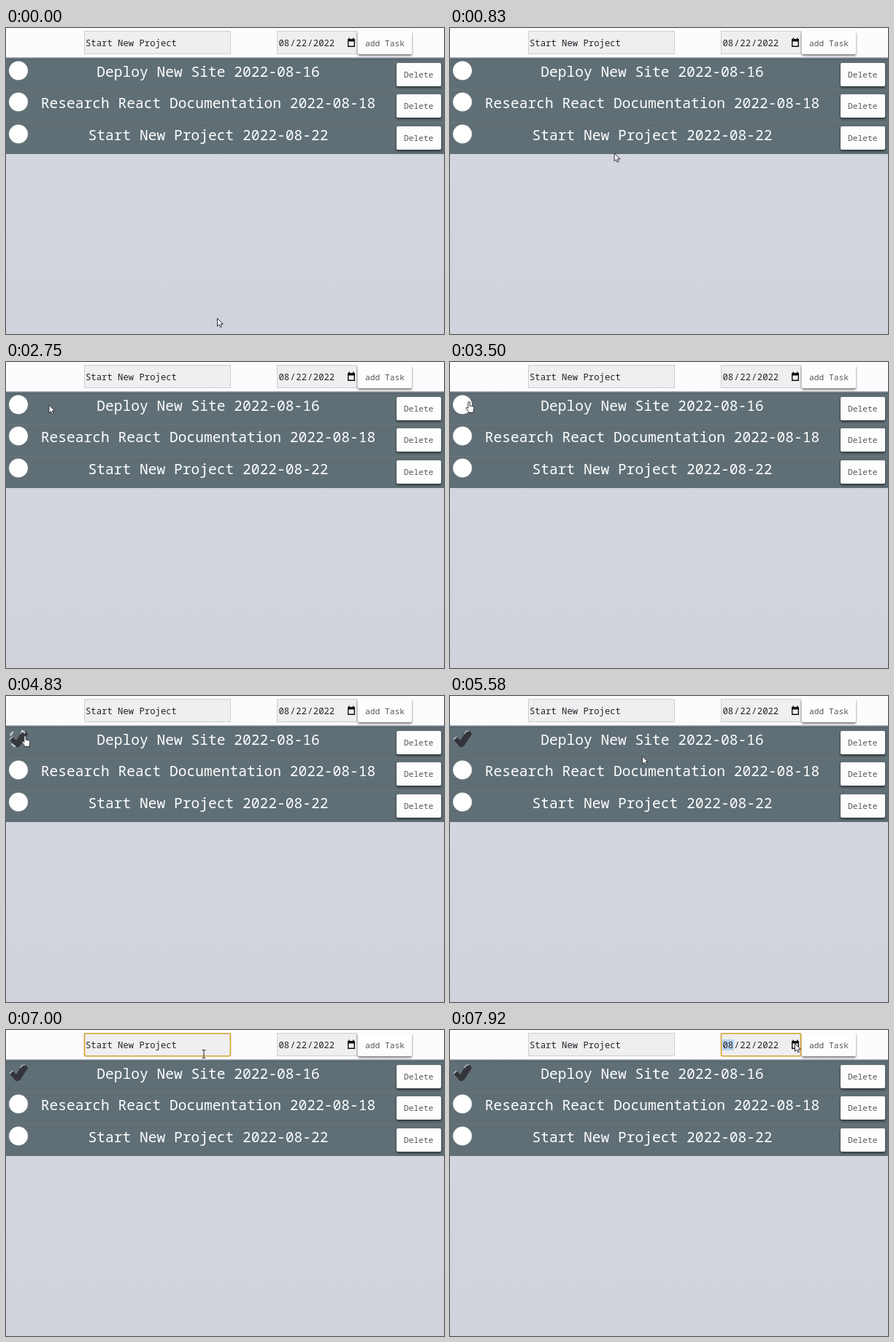
Recreate the animation shown at these times as an HTML page. Size 600 by 420 pixels, loop 8 s.

```html
<!DOCTYPE html>
<html lang="en">
<head>
<meta charset="utf-8">
<title>Task list</title>
<style>
  html, body { margin: 0; width: 100%; height: 100%; overflow: hidden; background: #d1d4de; }
  svg { display: block; }
  text { font-family: "Noto Sans Mono", "DejaVu Sans Mono", monospace; white-space: pre; }
  .task { font-size: 19.6px; fill: #fff; text-anchor: middle; }
  .field { font-size: 12.25px; fill: #26262a; }
  .label { font-size: 11.25px; fill: #56565b; }
  .box { fill: #efeef0; stroke: #cfcfd2; }
  .focus { fill: none; stroke: #d3a22e; stroke-width: 1.6; }
  .button { fill: #fefdfe; filter: drop-shadow(.5px 2px 1.5px #0008); }
  .dot { fill: #fff; stroke: #fff6; }
  .pointer { fill: #fff; stroke: #2a2d33; stroke-linejoin: round; }
</style>
</head>
<body>
<svg width="600" height="420" viewBox="0 0 600 420">
  <defs>
    <linearGradient id="page" x2="0" y2="1">
      <stop stop-color="#d3d5df"/><stop offset="1" stop-color="#d0d3dc"/>
    </linearGradient>
    <linearGradient id="shade" x2="0" y2="1">
      <stop stop-color="#c9ccd5"/><stop offset=".45" stop-color="#57636f"/><stop offset="1" stop-color="#5f6f75"/>
    </linearGradient>
  </defs>
  <rect y="172" width="600" height="248" fill="url(#page)"/>
  <rect width="600" height="41" fill="#fdfbfd"/>
  <g id="rows"></g>
  <rect y="40" width="600" height="5" fill="url(#shade)"/>

  <rect class="box" x="107.5" y="4.5" width="200" height="31"/>
  <text class="field" x="109" y="25">Start New Project</text>
  <rect class="box" x="371.5" y="4.5" width="109" height="31"/>
  <rect id="select" x="373" y="13" width="16" height="15" fill="#b5d2ec"/>
  <g class="field">
    <text x="373.5" y="25">08</text><text x="389.3" y="25">/</text>
    <text x="397.3" y="25">22</text><text x="413" y="25">/</text>
    <text x="420.8" y="25">2022</text>
  </g>
  <path d="M468.7 16.5h8.6v8.8h-8.6z" fill="none" stroke="#111" stroke-width="1.4"/>
  <path d="M468 15h10v3.4h-10zM469.5 13.5h1.5v2h-1.5zM475 13.5h1.5v2h-1.5z" fill="#111"/>
  <rect class="button" x="482" y="4" width="74" height="32" rx="2"/>
  <text class="label" x="492" y="24.5">add Task</text>
  <rect id="nameFocus" class="focus" x="107.5" y="4.7" width="200" height="31" rx="2"/>
  <rect id="dateFocus" class="focus" x="371.5" y="4.7" width="109" height="31" rx="2"/>

  <g id="tick">
    <path d="M5 60L9 56L14 61L22 48.5L27 48L30 52L19 69L14 70.5Z" fill="#34353a"/>
    <path d="M5 60L9 56M20 52L22 48.5L26 48" fill="none" stroke="#cfd3d6" stroke-width="1.2"/>
  </g>
  <circle id="ring" cx="17" cy="58.5" fill="none" stroke="#fff" pathLength="100" stroke-dashoffset="-5.5"/>

  <g id="cursor">
    <path id="arrow" class="pointer" d="M.5 .5V11.3L3 9L4.7 12.7L6.5 11.9L4.9 8.3H8.3Z"/>
    <path id="hand" class="pointer" d="M-1.2 1.2Q0 -.4 1.2 1.2V6L5.5 7Q7.2 7.4 7 9.2L6 13.2V15.5H-.8V13.8L-4 9.6Q-4 7.8 -2.4 8.4L-1.2 9.6Z"/>
    <path id="beam" fill="none" stroke="#222" d="M-2.5 -5.5H-.7L0 -5L.7 -5.5H2.5M0 -5V5M-2.5 5.5H-.7L0 5L.7 5.5H2.5"/>
  </g>
</svg>
<script>
const $ = id => document.getElementById(id);
const show = (id, on) => $(id).setAttribute("visibility", on ? "visible" : "hidden");
const clamp = v => Math.min(1, Math.max(0, v));

const tasks = [
  "Deploy New Site 2022-08-16",
  "Research React Documentation 2022-08-18",
  "Start New Project 2022-08-22"
];
$("rows").innerHTML = tasks.map((task, i) => `
  <g transform="translate(0 ${Math.round(42 + i * 43.4)})">
    <rect width="600" height="44" fill="#5f6f75"/>
    <rect width="600" height="1" fill="#6f7474"/>
    ${i ? '<circle class="dot" cx="17" cy="16.5" r="12.8"/>' : ""}
    <text class="task" x="277" y="25">${task}</text>
    <rect class="button" x="535" y="6" width="61" height="32" rx="2"/>
    <text class="label" x="545" y="26">Delete</text>
  </g>`).join("");

// Pointer sweeps, each a quadratic curve; times in steps of 1/12 second
const spots = { check: [26, 54], name: [271, 33], date: [472, 18], bar: [44, 23], right: [386, 60] };
const sweeps = [
  { start: 0, end: 12, from: [289, 398], via: [560, 420], to: [88, 63] },
  { start: 24, end: 34, from: [300, 406], via: [110, 200], to: spots.bar },
  { start: 35, end: 42, from: spots.bar, via: spots.bar, to: spots.check },
  { start: 60, end: 70, from: spots.check, via: [170, 114], to: spots.right },
  { start: 70, end: 80, from: spots.right, via: [330, 0], to: spots.name },
  { start: 84, end: 93, from: spots.name, via: [240, 40], to: spots.date }
];

function pointer(step) {
  const { start, end, from, via, to } = sweeps.findLast(s => s.start <= step);
  const t = clamp((step - start) / (end - start)), u = 1 - t;
  return from.map((v, i) => u * u * v + 2 * u * t * via[i] + t * t * to[i]);
}

function drawPointer(step) {
  const [x, y] = pointer(step);
  const visible = step < 13 || step > 24;
  const onCheck = Math.hypot(x - 17, y - 58.5) < 13;
  const onInput = x > 107 && x < 308 && y > 4 && y < 37;
  $("cursor").setAttribute("transform", `translate(${x} ${y})`);
  show("hand", visible && onCheck);
  show("beam", visible && onInput);
  show("arrow", visible && !onCheck && !onInput);
}

// The filled circle opens from its centre, breaks up and fades while the tick appears
function drawCheck(step) {
  const open = clamp((step - 50) / 10);
  const width = 13 * (1 - open), ring = $("ring");
  ring.setAttribute("r", 13 - width / 2);
  ring.setAttribute("stroke-width", width);
  ring.setAttribute("stroke-dasharray", open > 0.5 ? "9 16" : "none");
  ring.setAttribute("opacity", 1 - open / 2);
  show("ring", open < 1);
  $("tick").setAttribute("opacity", clamp(open * 1.2));
}

function frame() {
  const step = Math.floor((performance.now() % 8000) * 0.012 + 0.1) % 96;
  drawPointer(step);
  drawCheck(step);
  show("nameFocus", step >= 78 && step < 94);
  show("dateFocus", step >= 94);
  show("select", step >= 94);
  requestAnimationFrame(frame);
}
frame();
</script>
</body>
</html>
```
